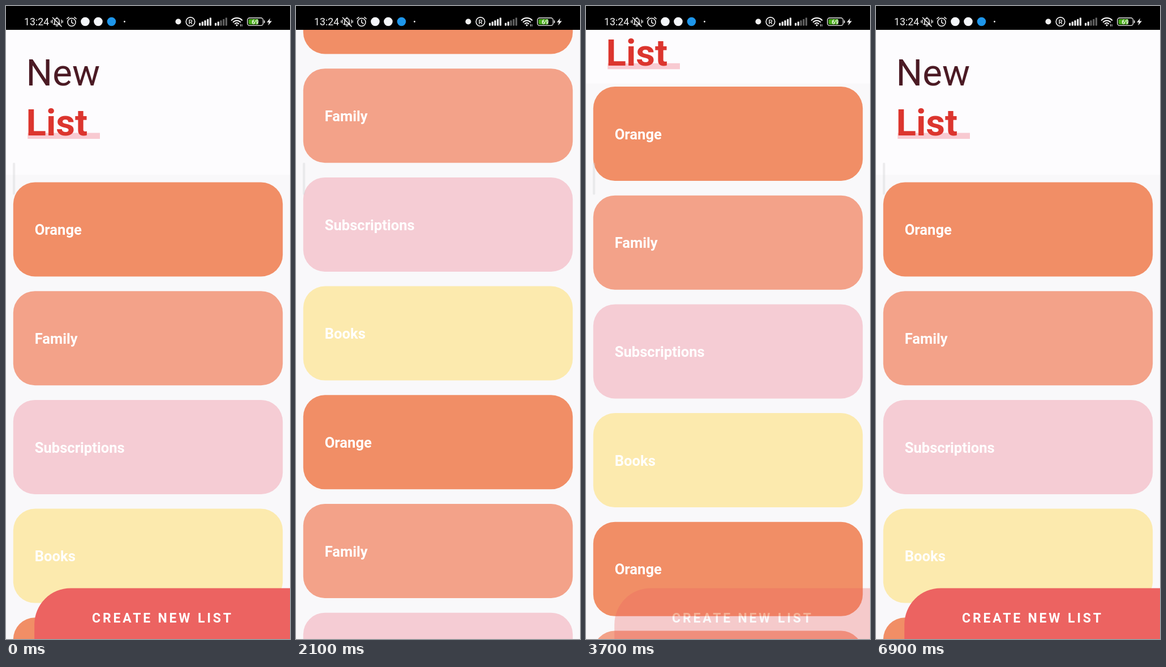
An HTML page for the animation above (7000 ms loop, 502 px wide and 1115 px high).

```html
<!DOCTYPE html>
<html lang="en">
<head>
<meta charset="utf-8">
<title>New List</title>
<style>
  html, body { margin: 0; width: 100%; height: 100%; overflow: hidden; background: #f9f8fa; }
  svg { display: block; width: 502px; height: 1115px; font-family: Roboto, sans-serif; }
  .label { font-size: 25.6px; font-weight: 700; fill: #fff; }
  .title { font-size: 65.5px; }
  .line { fill: none; stroke: #f2f2f2; stroke-width: 1.6; stroke-linecap: round; stroke-linejoin: round; }
</style>
</head>
<body>
<svg viewBox="0 0 502 1115">
  <rect width="502" height="1115" fill="#f9f8fa"/>
  <g id="list"></g>

  <g id="header">
    <rect y="-20" width="502" height="317.6" fill="#fdfcfe"/>
    <g id="titles">
      <rect x="38.3" y="223.5" width="127.7" height="10.5" fill="#f8cad1"/>
      <text class="title" x="35.5" y="140" fill="#4b1a24">New</text>
      <text class="title" x="35.5" y="228" fill="#dc352e" font-weight="700">List</text>
    </g>
  </g>

  <g id="button">
    <path d="M50.2 1115V1089.5A64 64 0 0 1 114.2 1025.5H502V1115Z" fill="#ec6361"/>
    <text x="152" y="1085.5" font-size="23" font-weight="700" letter-spacing="3.83" fill="#fff">CREATE NEW LIST</text>
  </g>

  <rect x="12" y="276" width="4.2" height="56.5" rx="2" fill="#d2d2d6" fill-opacity=".38"/>

  <g id="status">
    <rect width="502" height="42" fill="#000"/>
    <text x="32" y="34" font-size="17.8" fill="#f2f2f2">13:24</text>
    <!-- muted bell -->
    <g class="line">
      <path d="M84.5 32.5H95.5L94 30V26A4 4 0 0 0 86 26V30ZM90 20V21.5M88.5 35H91.5M82.5 20.5L98 36"/>
      <path d="M82 24.5V30M79.8 26V29M98 24.5V30M100.2 26V29" stroke-width="1.3"/>
    </g>
    <!-- alarm -->
    <g class="line">
      <circle cx="116" cy="28.5" r="7"/>
      <path d="M116 24.5V29L119 30.8M107.8 22.5L111 19.8M124.2 22.5L121 19.8"/>
    </g>
    <circle cx="140" cy="27.5" r="7.8" fill="#f4f6fa"/>
    <circle cx="163" cy="27.5" r="7.8" fill="#f4f6fa"/>
    <circle cx="186.5" cy="27.5" r="7.8" fill="#1e96ea"/>
    <circle cx="209.5" cy="27.5" r="1.4" fill="#f2f2f2"/>
    <circle cx="304.5" cy="27.5" r="5" fill="#f2f2f2"/>
    <circle class="line" cx="326" cy="27.7" r="7.8"/>
    <text x="326" y="32" font-size="11.5" font-weight="500" text-anchor="middle" fill="#f2f2f2">R</text>
    <g id="bars"></g>
    <!-- wireless -->
    <g class="line" stroke-width="2.2">
      <path d="M398.8 25A13 13 0 0 1 417.2 25M401.8 28.2A8.8 8.8 0 0 1 414.2 28.2M404.8 31.2A4.6 4.6 0 0 1 411.2 31.2" style="stroke-width:2.2"/>
      <circle cx="408" cy="33.8" r=".8"/>
      <path d="M414.5 32.5V35.5M417 32.5V35.5" style="stroke-width:1"/>
    </g>
    <!-- battery -->
    <rect x="426.7" y="21" width="27.8" height="13.4" rx="4" fill="none" stroke="#e8e8e8" stroke-width="1.4"/>
    <path d="M431 23H446V32.4H431A2.3 2.3 0 0 1 428.7 30.1V25.3A2.3 2.3 0 0 1 431 23Z" fill="#48ad18"/>
    <path d="M456.8 26V29.5" class="line"/>
    <text x="440.4" y="31.8" font-size="11" font-weight="500" text-anchor="middle" fill="#fff">69</text>
    <path d="M467 21.5L461 28.7H464.7L463.2 34.2L470 26.6H465.8Z" fill="#f2f2f2"/>
  </g>
</svg>

<script>
const $ = id => document.getElementById(id);
const LOOP = 7000, STEP = 100;
const HEADER = 255.6, PAD = 38.3, PITCH = 191.7;

const kinds = [
  ["Orange", "#f18e66"], ["Family", "#f3a289"],
  ["Subscriptions", "#f5ccd4"], ["Books", "#fceaae"]
];
$("list").innerHTML = Array.from({ length: 8 }, (_, i) => {
  const [name, color] = kinds[i % 4];
  return `<g transform="translate(0 ${310.5 + i * PITCH})">
    <rect x="12.8" width="476.4" height="166" rx="38.3" fill="${color}"/>
    <text class="label" x="50.7" y="92.7">${name}</text></g>`;
}).join("");

const bars = (x, lit) => Array.from({ length: 5 }, (_, i) => {
  const h = 5 + i * 2.3;
  return `<rect x="${x + i * 4.7}" y="${34.8 - h}" width="3.2" height="${h}" rx="1"
    fill="${i < lit ? "#f2f2f2" : "#626262"}"/>`;
}).join("");
$("bars").innerHTML = bars(341, 5) + bars(369, 2);

// Total content travel over time
const travel = [
  [0, 0], [500, 0], [1400, -213], [2000, -392], [2300, -392], [2800, -209],
  [3250, -7.5], [3400, -7.5], [3700, -168.5], [4050, -322], [4200, -322],
  [4300, -321], [4800, 0], [LOOP, 0]
];
const fade = [
  [0, 1], [650, 1], [900, 0], [2350, 0], [2600, 1], [3525, 1],
  [3775, 0], [4112, 0], [4362, 1], [LOOP, 1]
];
// Each drag direction anchors the header at a different list position
const anchors = [[2150, 0], [3325, 136], [4120, 7.5], [LOOP + 1, 66]];

const slope = (k, i) => (k[i + 1][1] - k[i][1]) / (k[i + 1][0] - k[i][0]);
const tangent = (k, i) => {
  if (i < 1 || i >= k.length - 1) return 0;
  const a = slope(k, i - 1), b = slope(k, i);
  return a * b > 0 ? 2 * a * b / (a + b) : 0;
};
const segment = (k, t) => {
  let i = 0;
  while (i < k.length - 2 && t >= k[i + 1][0]) i++;
  return i;
};
const linear = (k, t) => {
  const i = segment(k, t);
  return k[i][1] + slope(k, i) * (t - k[i][0]);
};
const smooth = (k, t) => {
  const i = segment(k, t), [t0, a] = k[i], [t1, b] = k[i + 1];
  const d = t1 - t0, u = (t - t0) / d, v = 1 - u;
  return a * v * v * (1 + 2 * u) + b * u * u * (3 - 2 * u)
    + d * u * v * (v * tangent(k, i) - u * tangent(k, i + 1));
};
const move = (id, y) => $(id).setAttribute("transform", `translate(0 ${y.toFixed(2)})`);

function draw(t) {
  const y = smooth(travel, t);
  const anchor = anchors.find(a => t < a[0])[1];
  const head = Math.max(-HEADER, Math.min(0, y + anchor));
  move("list", y);
  move("header", head);
  // The bottom padding collapses before the titles start to move
  move("titles", Math.min(0, head + PAD) - head);
  $("button").setAttribute("opacity", linear(fade, t));
}

const start = performance.now();
function tick() {
  const t = (performance.now() - start) % LOOP;
  draw(Math.floor(t / STEP) * STEP);
  requestAnimationFrame(tick);
}
tick();
</script>
</body>
</html>
```
